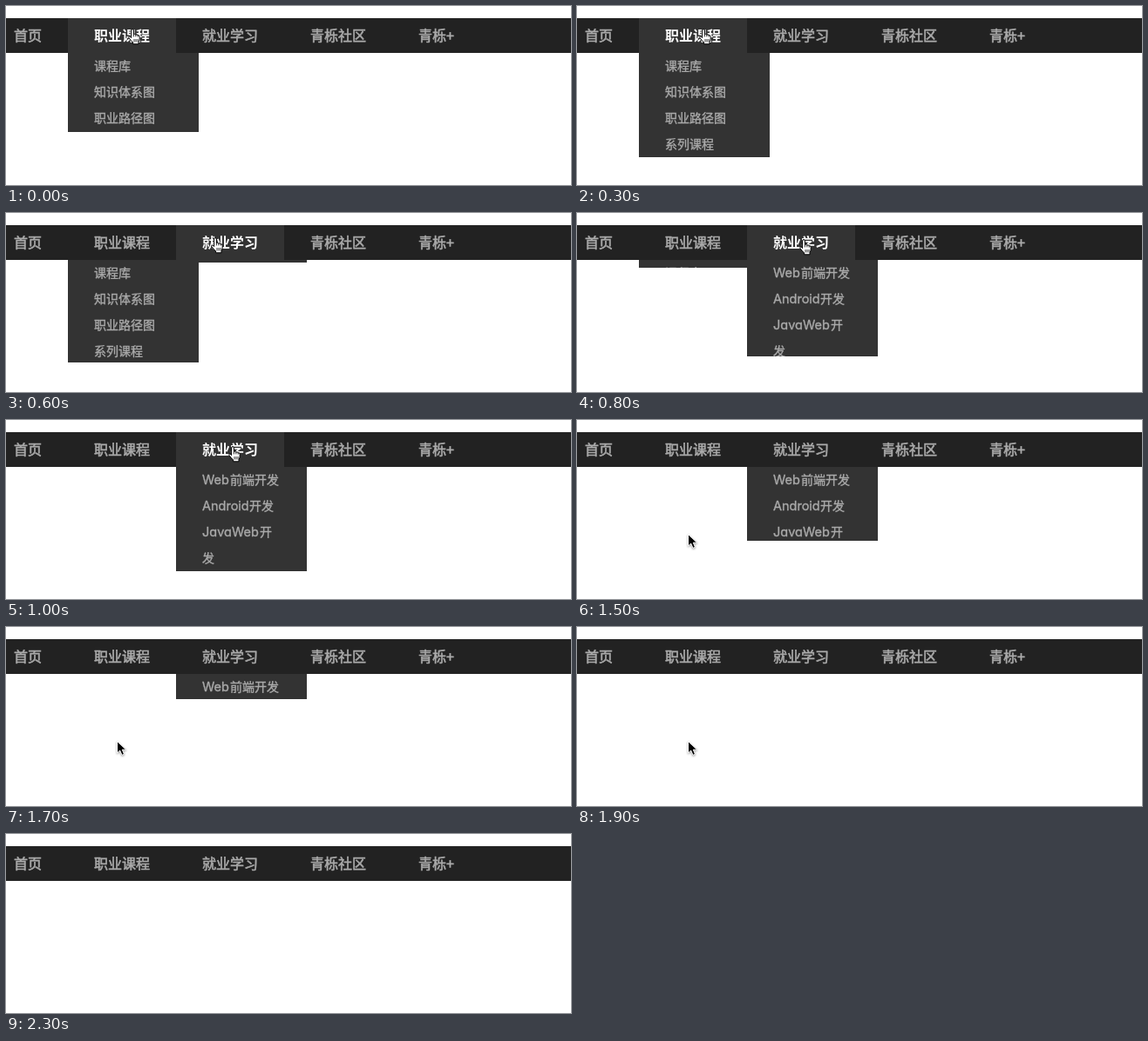
An HTML page for the animation above (2.4 s loop, 648 by 206 pixels).

```html
<!DOCTYPE html>
<html lang="zh">
<head>
<meta charset="utf-8">
<title>Drop-down menu</title>
<style>
html, body { margin: 0; width: 100%; height: 100%; overflow: hidden; background: #fff; }
svg { display: block; }
text { fill: #aaa; stroke: #aaa; font-family: "Noto Sans CJK SC", "Noto Sans CJK", sans-serif; }
.nav text { font-size: 16px; font-weight: 500; stroke-width: .6px; }
.nav text.on { fill: #fff; font-weight: 600; stroke: none; }
.menu text { font-size: 14px; font-weight: 500; stroke-width: .35px; }
.menu .latin { font: 400 14.5px Inter, sans-serif; font-feature-settings: "cv11"; }
#arrow { filter: drop-shadow(0 1px 1px rgba(0, 0, 0, .4)); }
</style>
</head>
<body>
<svg id="stage" width="648" height="206" viewBox="0 0 648 206">
  <defs></defs>
  <rect y="14" width="648" height="40" fill="#222"/>
  <rect id="hover" y="14" width="124" height="40" fill="#333"/>
  <g id="nav" class="nav"></g>
  <g id="menus" class="menu"></g>
  <g id="hand" stroke="#000" stroke-linejoin="round">
    <path fill="#fff" d="M3.6 10.6V2Q3.6 .6 5 .6T6.4 2V6.6Q7.6 5.8 8.8 7Q10 6.4 11.2 7.6Q13.2 7.4 13.2 9.4V12Q13 14 12 15.5V17.8H5.6V16Q3 13.5 .9 10.6Q.4 9 1.8 9Q2.6 9.2 3.6 10.6Z"/>
    <path fill="none" stroke-width=".8" d="M6.4 6.6V9.4M8.8 7V9.4M11.2 7.6V9.6M7 12V15.5M9 12V15.5M11 12V15.5"/>
  </g>
  <path id="arrow" fill="#000" stroke="#fff" d="M.5 .5V14L3.7 11.1L6 16.4L8.5 15.3L6.3 10.2H10.7Z"/>
</svg>
<script>
const LOOP = 2400, TICK = 100, BAR = 54, FULL = 120;
const $ = id => document.getElementById(id);

function add(parent, tag, attrs, label) {
  const el = document.createElementNS("http://www.w3.org/2000/svg", tag);
  for (const k in attrs) el.setAttribute(k, attrs[k]);
  if (label) el.textContent = label;
  parent.appendChild(el);
  return el;
}

const nav = [[9, "首页"], [101, "职业课程"], [225, "就业学习"], [349, "青栎社区"], [473, "青栎+"]]
  .map(([x, label]) => add($("nav"), "text", { x, y: 40 }, label));

// Rows are [latin, latin width, han]
function makeMenu(id, x, rows) {
  const clip = add(add($("stage").querySelector("defs"), "clipPath", { id }), "rect",
    { x, y: BAR, width: 150, height: 0 });
  const g = add($("menus"), "g", { "clip-path": `url(#${id})` });
  add(g, "rect", { x, y: BAR, width: 150, height: FULL, fill: "#333" });
  rows.forEach(([latin, w, han], i) => {
    const y = 74 + 30 * i;
    if (latin) add(g, "text", { x: x + 30, y, class: "latin" }, latin);
    add(g, "text", { x: x + 30 + w, y }, han);
  });
  return clip;
}

const courses = makeMenu("courses", 71,
  ["课程库", "知识体系图", "职业路径图", "系列课程"].map(s => ["", 0, s]));
const jobs = makeMenu("jobs", 195,
  [["Web", 32, "前端开发"], ["Android", 54, "开发"], ["JavaWeb", 66, "开"], ["", 0, "发"]]);

const swing = p => 0.5 - Math.cos(Math.PI * Math.min(1, Math.max(0, p))) / 2;

// Tick, x, y, shape
const pointer = [
  [0, 140, 26, "hand"], [6, 235, 28, "hand"], [7, 250, 29, "hand"], [8, 255, 30, "hand"],
  [14, 127, 131, "arrow"], [20, 128, 175, "arrow"], [21, 0, 0, ""]
];

function draw(time) {
  const s = Math.floor((time % LOOP) / TICK);

  const first = s < 6 ? swing(0.673 + 0.154 * s) : 1 - swing(0.09 + 0.367 * (s - 6));
  const second = s < 6 ? 0 : s < 14 ? swing(0.095 + 0.365 * (s - 6)) : 1 - swing(0.21 + 0.154 * (s - 14));
  courses.setAttribute("height", Math.round(FULL * first));
  jobs.setAttribute("height", Math.round(FULL * second));

  const active = s < 6 ? 1 : s < 14 ? 2 : -1;
  nav.forEach((el, i) => el.classList.toggle("on", i === active));
  $("hover").setAttribute("x", active < 0 ? -200 : 71 + 124 * (active - 1));

  const [, x, y, shape] = pointer.filter(k => k[0] <= s).pop();
  for (const id of ["hand", "arrow"]) {
    $(id).setAttribute("transform", `translate(${x} ${y})`);
    $(id).setAttribute("visibility", id === shape ? "visible" : "hidden");
  }
}

const start = performance.now();
function frame() {
  draw(performance.now() - start);
  requestAnimationFrame(frame);
}
frame();
</script>
</body>
</html>
```
